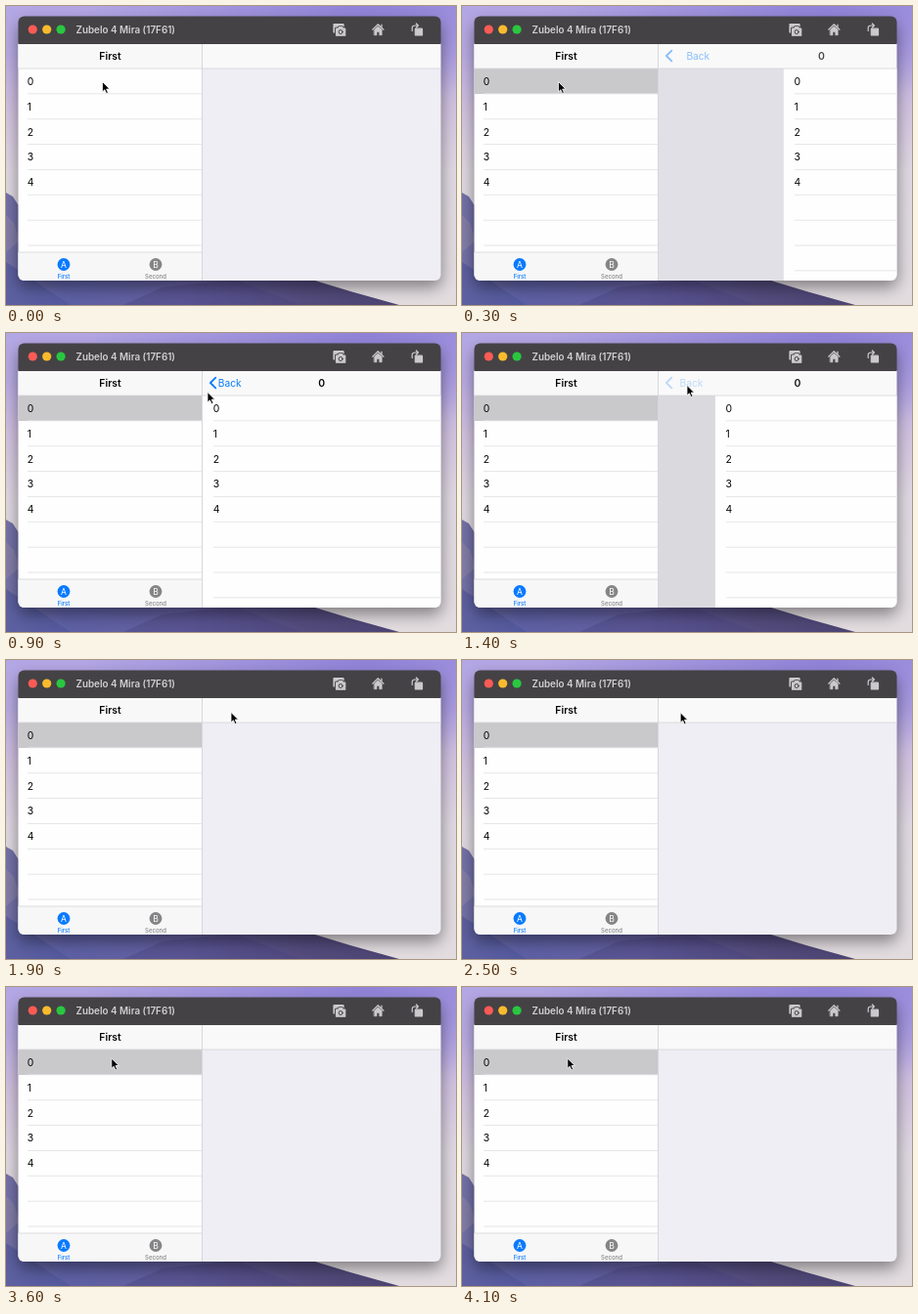
Animation of 460x306 px, one loop 4200 ms. Source, as an HTML page:

```html
<!DOCTYPE html>
<html lang="en">
<head>
<meta charset="utf-8">
<title>Split view navigation</title>
<style>
  html, body { margin: 0; width: 100%; height: 100%; overflow: hidden; }
  svg { display: block; width: 460px; height: 306px; }
  text { font: 400 10.4px Inter, Roboto, sans-serif; fill: #060606; }
  .bold { font-weight: 600; }
  .mid { text-anchor: middle; }
  .head { font-size: 9.85px; fill: #d2d0d3; }
  .back { font-size: 10.2px; fill: #087dfa; }
  .tab { font-size: 6px; font-weight: 500; }
  .glyph { font-size: 8.6px; fill: #fff; }
  .line { stroke: #e6e5e9; }
  .tool { fill: none; stroke: #cbc9cc; stroke-width: 1.2; stroke-linejoin: round; stroke-linecap: round; }
</style>
</head>
<body>
<svg viewBox="0 0 460 306">
  <defs>
    <linearGradient id="sky" x2="0" y2="1">
      <stop offset="0" stop-color="#b2a6e4"/>
      <stop offset=".16" stop-color="#b9abe3"/>
      <stop offset=".34" stop-color="#d2c3e0"/>
      <stop offset=".55" stop-color="#e0d9e3"/>
      <stop offset="1" stop-color="#e2dcdf"/>
    </linearGradient>
    <radialGradient id="dusk" gradientUnits="userSpaceOnUse" cx="0" cy="0" r="1" gradientTransform="translate(370 0) scale(290 95)">
      <stop offset="0" stop-color="#9082d8"/>
      <stop offset="1" stop-color="#9082d8" stop-opacity="0"/>
    </radialGradient>
    <linearGradient id="rock" gradientUnits="userSpaceOnUse" x2="400">
      <stop offset="0" stop-color="#7673a8"/>
      <stop offset=".15" stop-color="#5d60a4"/>
      <stop offset=".45" stop-color="#645f9f"/>
      <stop offset=".75" stop-color="#544c7e"/>
      <stop offset="1" stop-color="#4c4472"/>
    </linearGradient>
    <filter id="blur" x="-20%" y="-20%" width="140%" height="140%">
      <feGaussianBlur stdDeviation="8"/>
    </filter>
    <clipPath id="frame"><rect x="12.5" y="10.5" width="432" height="270.5" rx="6"/></clipPath>
    <clipPath id="detail"><rect x="201" y="38" width="244" height="243"/></clipPath>
  </defs>

  <rect width="460" height="306" fill="url(#sky)"/>
  <rect width="460" height="100" fill="url(#dusk)"/>
  <path d="M0 191 7 195 14 206 60 240 280 262 316 281 352 292 402 306H0Z" fill="url(#rock)"/>
  <path d="M0 214 8 222 14 240 0 252Z" fill="#8f88a9" opacity=".55"/>
  <path d="M0 262 24 278 66 306H0Z" fill="#4f559c" opacity=".6"/>
  <path d="M120 306 160 288 235 280 300 306Z" fill="#4a4480" opacity=".4"/>
  <rect x="12" y="18" width="433" height="270" rx="8" fill="#000" opacity=".42" filter="url(#blur)"/>

  <g clip-path="url(#frame)">
    <rect x="12" y="38" width="189" height="243" fill="#fefefe"/>
    <rect id="picked" x="12" y="64" width="188" height="26" fill="#c9c8cb"/>
    <rect x="12" y="38" width="189" height="26" fill="#f8f8f8"/>
    <text class="bold mid" x="106.5" y="54.7">First</text>
    <g id="master"></g>
    <rect x="12" y="252" width="189" height="29" fill="#f7f7f8"/>
    <path d="M12 252H200" stroke="#d3d2d6" stroke-width=".8"/>
    <g id="tabs"></g>

    <g clip-path="url(#detail)">
      <rect x="201" y="64" width="244" height="217" fill="#efeef4"/>
      <rect id="dim" x="201" y="64" width="244" height="217"/>
      <g id="page">
        <rect x="201" y="64" width="244" height="217" fill="#fefefe"/>
        <g id="rows"></g>
      </g>
      <rect x="201" y="38" width="244" height="26" fill="#f9f9f9"/>
      <g id="back">
        <path d="M214.3 45.6 208.9 51 214.3 56.4" fill="none" stroke="#087dfa" stroke-width="1.8" stroke-linecap="round" stroke-linejoin="round"/>
        <text class="back" id="label" x="216.8" y="54.8">Back</text>
      </g>
      <text class="bold mid" id="title" x="322.7" y="54.7">0</text>
    </g>
    <path d="M12 64H445" stroke="#d3d2d6" stroke-width=".8"/>
    <path d="M200.5 38V281" stroke="#d3d2d7" stroke-width=".9"/>

    <rect x="12" y="10" width="433" height="29" fill="#444245"/>
    <circle cx="27.3" cy="24" r="4.6" fill="#fc5b54"/>
    <circle cx="41.7" cy="24" r="4.6" fill="#f9bb2d"/>
    <circle cx="56.1" cy="24" r="4.6" fill="#29c73f"/>
    <text class="head bold" x="71.5" y="27.6">Zubelo 4 Mira (17F61)</text>

    <g class="tool">
      <rect x="335" y="18.5" width="10" height="8.5" rx=".6" fill="#cbc9cc"/>
      <path d="M337.5 23H339.6L340.6 21.7H343.6L344.6 23H346.7V30.2H337.5Z" stroke="#444245" stroke-width="3"/>
      <path d="M337.5 23H339.6L340.6 21.7H343.6L344.6 23H346.7V30.2H337.5Z" fill="#cbc9cc"/>
      <circle cx="342.1" cy="26.5" r="2" stroke="#444245" stroke-width="1"/>
      <path d="M374.7 24.2 380.3 18.8 386 24.2M384 19V21.5"/>
      <path d="M376.5 24.2 380.3 20.7 384.2 24.2V29.8H381.7V26.5H379V29.8H376.5Z" fill="#cbc9cc" stroke-width=".6"/>
      <rect x="418.3" y="23.2" width="7.2" height="6.8" rx=".6" fill="#cbc9cc"/>
      <path d="M415.2 25.5V22.5Q415.2 20 418 20H421M419.4 18 421.4 20 419.4 22"/>
    </g>
  </g>

  <path id="cursor" d="M0 0V10.4L2.4 8.2 4.1 12 5.9 11.2 4.2 7.5H7.5Z" fill="#000" stroke="#fff" stroke-width=".8" stroke-linejoin="round"/>
</svg>

<script>
const LOOP = 4200, STEP = 100, WIDTH = 243.5, ROW = 25.86;
const PRESS = 100, PUSH = 200, TOUCH = 1300, POP = 1342;
const $ = id => document.getElementById(id);

// time, x, y
const stops = [
  [0, 98.5, 77.5], [600, 98.5, 77.5], [900, 206, 60.5], [1200, 230, 53.5],
  [2400, 230, 53.5], [3100, 107.5, 58.3], [3400, 107.8, 73], [LOOP, 107.8, 73]
];

function list(x, right, lines) {
  let out = '';
  for (let i = 0; i < lines; i++) {
    const y = 64 + ROW * i;
    if (i < 5) out += `<text x="${x - .3}" y="${y + 16.8}">${i}</text>`;
    out += `<path class="line" d="M${x} ${y + ROW}H${right}"/>`;
  }
  return out;
}

function tab(x, letter, name, color) {
  return `<circle cx="${x}" cy="264.5" r="6.4" fill="${color}"/>
    <text class="glyph mid" x="${x}" y="267.6">${letter}</text>
    <text class="tab mid" x="${x}" y="279.2" style="fill:${color}">${name}</text>`;
}

$('master').innerHTML = list(22, 200, 7);
$('rows').innerHTML = list(212, 445, 8);
$('tabs').innerHTML = tab(59, 'A', 'First', '#087aff') + tab(153, 'B', 'Second', '#858587');

// Critically damped spring, from 1 down to 0
const spring = ms => (1 + .016 * ms) * Math.exp(-.016 * ms);

function offset(t) {
  if (t < PUSH) return 1;
  const p = t < POP ? spring(t - PUSH) : 1 - spring(t - POP);
  return p < .006 ? 0 : p > .992 ? 1 : p;
}

function pointer(t) {
  const i = stops.findIndex(s => s[0] > t);
  const [t0, x0, y0] = stops[i - 1], [t1, x1, y1] = stops[i];
  const u = (t - t0) / (t1 - t0), e = u * u * (3 - 2 * u);
  return [x0 + (x1 - x0) * e, y0 + (y1 - y0) * e];
}

const move = (id, x, y = 0) => $(id).setAttribute('transform', `translate(${x} ${y})`);
const fade = (id, v) => $(id).setAttribute('opacity', v);

function draw(t) {
  const p = offset(t);
  move('page', WIDTH * p);
  move('label', 24 * p);
  move('title', 85 * p);
  fade('dim', .12 * (1 - p));
  fade('title', 1 - p * p);
  fade('back', (1 - p) * (t < TOUCH ? 1 : .33));
  fade('picked', t < PRESS ? 0 : 1);
  move('cursor', ...pointer(t));
}

function tick() {
  const t = performance.now() % LOOP;
  draw(Math.floor(t / STEP) * STEP);
  requestAnimationFrame(tick);
}
tick();
</script>
</body>
</html>
```
